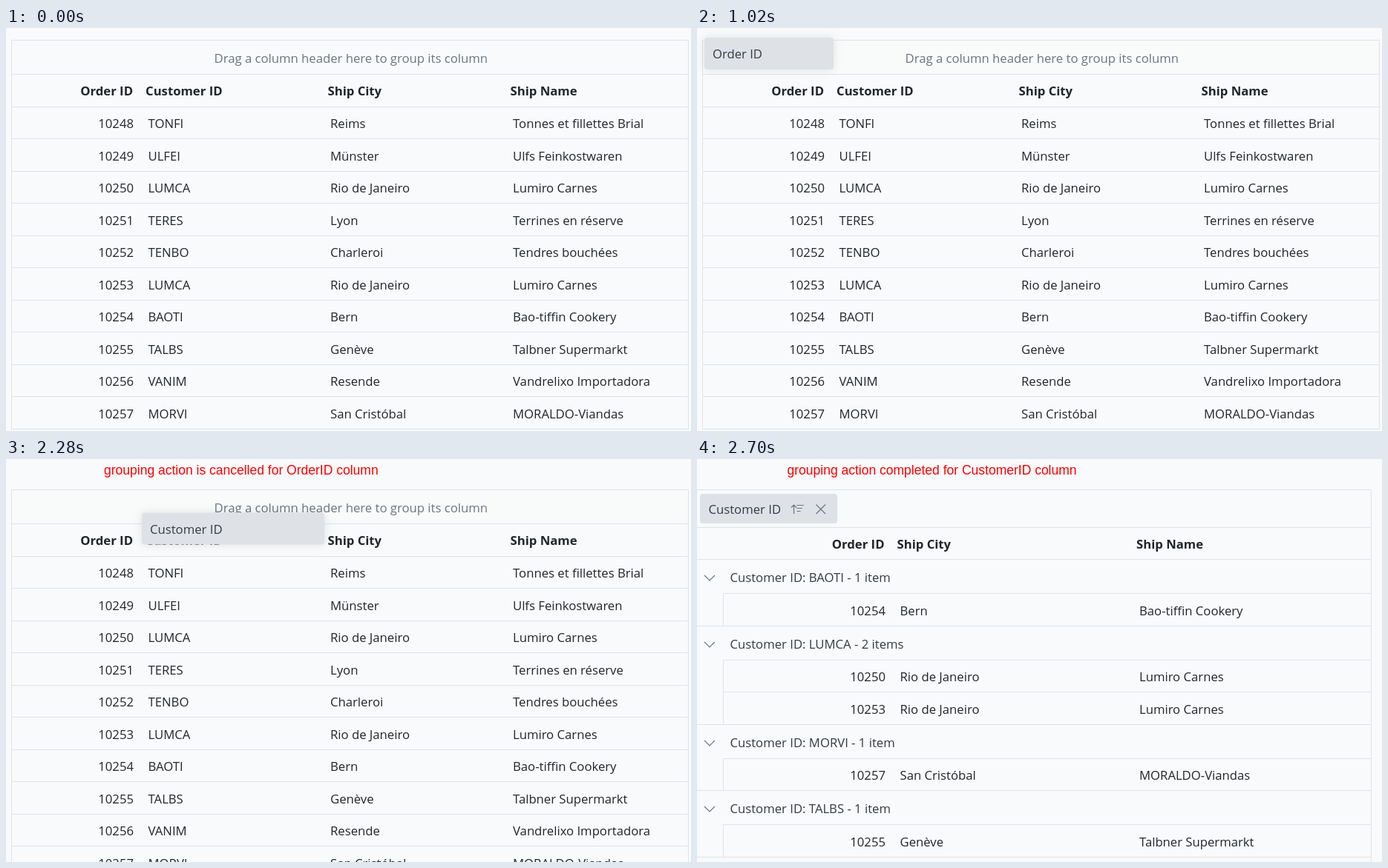
Write an HTML page that moves like this. It is 923 by 544 pixels and loops after 3.9 s.

```html
<!DOCTYPE html>
<html lang="en">
<head>
<meta charset="utf-8">
<title>Grid column grouping</title>
<style>
  html, body { margin: 0; width: 100%; height: 100%; overflow: hidden; background: #f8fafc; }
  svg { display: block; }
  text { font: 16.7px "Open Sans", "Noto Sans", sans-serif; fill: #212529; }
  .head { font-weight: 700; }
  .hint { fill: #6c757d; }
  .group { fill: #343a40; }
  .message { font: 17.5px "Liberation Sans", Arial, sans-serif; fill: #f00; }
  .line { stroke: #dfe3e8; fill: none; }
  .icon { stroke: #6c757d; stroke-width: 1.2; fill: none; }
  .chip { fill: #dee2e6; }
  .tile { filter: drop-shadow(0 0 6px rgba(0, 0, 0, .1)); }
  .tile text, .chip-label { fill: #343a40; }
</style>
</head>
<body>
<svg id="stage" width="923" height="544" viewBox="0 0 923 544"></svg>
<script>
const LOOP = 3900;
const STEP = 60;
const stage = document.getElementById('stage');

const orders = [
  ['TONFI', 'Reims', 'Tonnes et fillettes Brial'],
  ['ULFEI', 'Münster', 'Ulfs Feinkostwaren'],
  ['LUMCA', 'Rio de Janeiro', 'Lumiro Carnes'],
  ['TERES', 'Lyon', 'Terrines en réserve'],
  ['TENBO', 'Charleroi', 'Tendres bouchées'],
  ['LUMCA', 'Rio de Janeiro', 'Lumiro Carnes'],
  ['BAOTI', 'Bern', 'Bao-tiffin Cookery'],
  ['TALBS', 'Genève', 'Talbner Supermarkt'],
  ['VANIM', 'Resende', 'Vandrelixo Importadora'],
  ['MORVI', 'San Cristóbal', 'MORALDO-Viandas']
].map(([customer, city, name], i) => ({ id: 10248 + i, customer, city, name }));

function add(parent, tag, attrs = {}, content = '') {
  const node = document.createElementNS('http://www.w3.org/2000/svg', tag);
  for (const key in attrs) node.setAttribute(key, attrs[key]);
  node.textContent = content;
  return parent.appendChild(node);
}

const label = (parent, x, y, content, cls = '', anchor = 'start') =>
  add(parent, 'text', { x, y, class: cls, 'text-anchor': anchor }, content);
const path = (parent, d, cls = 'line') => add(parent, 'path', { d, class: cls });
const crisp = y => Math.floor(y) + 0.5;
const show = (node, visible) => node.setAttribute('visibility', visible ? 'visible' : 'hidden');

function buildFlatGrid() {
  const grid = add(stage, 'g');
  const dropArea = add(grid, 'rect', { x: 8, y: 17, width: 911, height: 45, fill: '#f9fafa' });
  path(grid, 'M7.5 541.5V16.5H919.5V541.5M7.5 62.5H919.5');
  label(grid, 280.5, 47, 'Drag a column header here to group its column', 'hint');
  label(grid, 171, 91, 'Order ID', 'head', 'end');
  label(grid, 188, 91, 'Customer ID', 'head');
  label(grid, 433.5, 91, 'Ship City', 'head');
  label(grid, 679.5, 91, 'Ship Name', 'head');
  for (let i = 0; i <= orders.length; i++) path(grid, `M7.5 ${crisp(106 + 43.5 * i)}H919.5`);
  orders.forEach((order, i) => {
    const y = Math.round(135 + 43.5 * i);
    label(grid, 172, y, order.id, '', 'end');
    label(grid, 191.5, y, order.customer);
    label(grid, 437, y, order.city);
    label(grid, 683, y, order.name);
  });
  return { grid, dropArea };
}

function buildGroupedGrid() {
  const grid = add(stage, 'g');
  label(grid, 121.5, 21, 'grouping action completed for CustomerID column', 'message');
  path(grid, 'M0 41.5H908.5V544M0 92.5H908.5M0 135.5H908.5');

  add(grid, 'rect', { x: 4, y: 47, width: 185, height: 40, rx: 4, class: 'chip' });
  label(grid, 15.5, 74, 'Customer ID', 'chip-label');
  path(grid, 'M130.5 74V62M127 65.5L130.5 62L134 65.5M134.5 62.5H144M134.5 66.5H142M134.5 70.5H139.5', 'icon');
  path(grid, 'M160.5 61.5L173 74M173 61.5L160.5 74', 'icon');

  label(grid, 252.5, 121, 'Order ID', 'head', 'end');
  label(grid, 269.5, 121, 'Ship City', 'head');
  label(grid, 592, 121, 'Ship Name', 'head');

  let y = 135.5;
  for (const customer of ['BAOTI', 'LUMCA', 'MORVI', 'TALBS']) {
    const items = orders.filter(order => order.customer === customer);
    const count = `${items.length} item${items.length > 1 ? 's' : ''}`;
    const base = Math.round(y + 30.5);
    path(grid, `M10 ${base - 9}l7 7l7 -7`, 'icon');
    label(grid, 44.5, base, `Customer ID: ${customer} - ${count}`, 'group');
    y += 46;
    const top = crisp(y);
    items.forEach(order => {
      const rowBase = Math.round(y + 29.1);
      path(grid, `M35.5 ${crisp(y)}H908.5`);
      label(grid, 254, rowBase, order.id, '', 'end');
      label(grid, 273.5, rowBase, order.city);
      label(grid, 596, rowBase, order.name);
      y += 43.6;
    });
    path(grid, `M35.5 ${top}V${crisp(y)}M0 ${crisp(y)}H908.5`);
  }
  return grid;
}

function buildTile(title, width) {
  const tile = add(stage, 'g', { class: 'tile' });
  add(tile, 'rect', { width, height: 43, rx: 4, class: 'chip' });
  label(tile, 11, 28, title);
  return tile;
}

const flat = buildFlatGrid();
const cancelled = label(stage, 132, 21, 'grouping action is cancelled for OrderID column', 'message');
const grouped = buildGroupedGrid();
const orderTile = buildTile('Order ID', 174);
const customerTile = buildTile('Customer ID', 246);

// Moves a tile in discrete steps, then holds it until the drop.
function drag(tile, t, start, end, drop, from, to) {
  const step = Math.floor((t - start) / STEP);
  const k = Math.min(1, Math.max(0, step * STEP / (end - start)));
  const [x, y] = from.map((value, i) => value + (to[i] - value) * k);
  tile.setAttribute('transform', `translate(${x} ${y})`);
  show(tile, t >= start && t < drop);
}

function render(t) {
  const shifted = t >= 1200;
  const done = t >= 2640;
  show(flat.grid, !done);
  show(flat.dropArea, t >= 1020 && !done);
  show(cancelled, shifted && !done);
  show(grouped, done);
  flat.grid.setAttribute('transform', `translate(0 ${shifted ? 25 : 0})`);
  drag(orderTile, t, 840, 1020, 1200, [9, 43], [10, 13]);
  drag(customerTile, t, 2160, 2460, 2640, [183, 87], [183, 51]);
}

const began = performance.now();
function frame() {
  render((performance.now() - began) % LOOP);
  requestAnimationFrame(frame);
}
frame();
</script>
</body>
</html>
```
